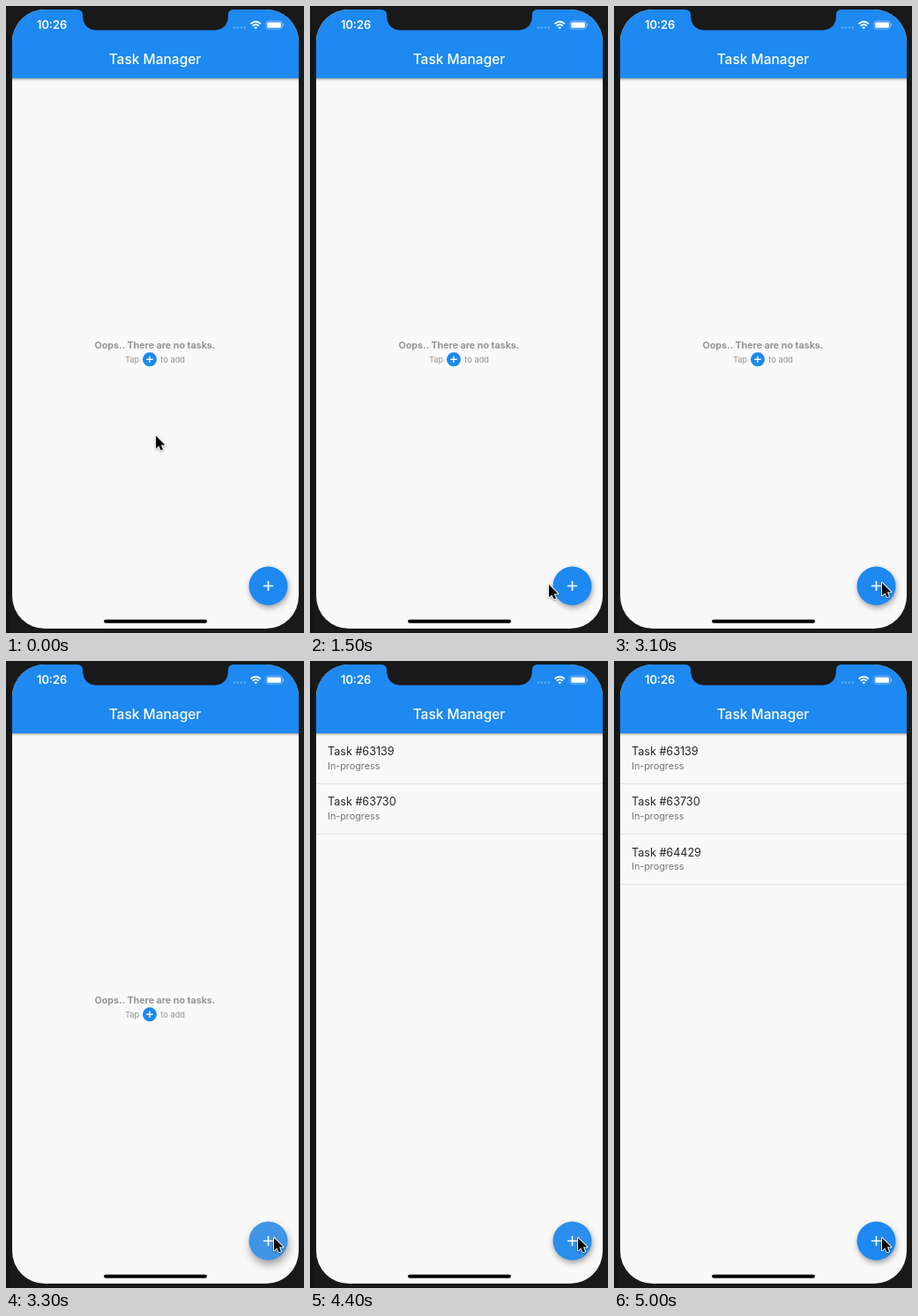
Animation of 338x712 px, one loop 8000 ms. Source, as an HTML page:

```html
<!DOCTYPE html>
<html lang="en">
<head>
<meta charset="utf-8">
<style>
html, body { margin: 0; width: 100%; height: 100%; overflow: hidden; background: #191919; }
svg { display: block; width: 338px; height: 712px; font-family: Inter, Roboto, sans-serif; }
#bar { filter: drop-shadow(0 1px 1.5px rgba(0,0,0,.45)); }
#cursor { filter: drop-shadow(0 1px 1px rgba(0,0,0,.35)); }
</style>
</head>
<body>
<svg viewBox="0 0 338 712">
  <defs>
    <clipPath id="screen"><rect x="7" y="4" width="325" height="703" rx="37"/></clipPath>
    <linearGradient id="edge"><stop stop-color="#0c0d11"/><stop offset="1" stop-color="#191919"/></linearGradient>
  </defs>
  <rect width="338" height="712" fill="#191919"/>
  <rect y="30" width="6" height="682" fill="url(#edge)"/>

  <g clip-path="url(#screen)">
    <rect width="338" height="712" fill="#f9f9f9"/>
    <g id="rows"></g>
    <rect id="bar" width="338" height="82" fill="#1d89f1"/>
    <path d="M80 3H259V4Q252 4 252 10Q252 27.5 235 27.5H104Q87 27.5 87 10Q87 4 80 4Z" fill="#191919"/>
    <text x="169" y="66" font-size="15.5" font-weight="500" fill="#fff" text-anchor="middle">Task Manager</text>

    <g fill="#fff">
      <text x="35" y="26" font-size="12.8" font-weight="600">10:26</text>
      <path d="M259 24.5H273" stroke="#fff" stroke-width="2.6" stroke-dasharray="0 4" stroke-linecap="round" opacity=".3"/>
      <g fill="none" stroke="#fff" stroke-width="1.9">
        <path d="M277.6 20.2Q283.2 15.2 288.8 20.2M279.7 22.6Q283.2 19.6 286.7 22.6"/>
      </g>
      <path d="M281.3 24.2Q283.2 22.8 285.1 24.2L283.2 26.3Z"/>
      <rect x="294.9" y="17" width="18.4" height="9.2" rx="2.6" fill="none" stroke="#fff" stroke-width=".8" opacity=".5"/>
      <rect x="296.3" y="18.4" width="15.6" height="6.4" rx="1.4"/>
      <rect x="314.3" y="20" width="1" height="3.2" rx=".5" opacity=".5"/>
    </g>

    <g id="empty" fill="#949494">
      <text x="169" y="389" font-size="10.7" font-weight="700" text-anchor="middle">Oops.. There are no tasks.</text>
      <g font-size="9.3">
        <text x="135" y="404.6">Tap</text>
        <text x="175.3" y="404.6">to add</text>
      </g>
      <circle cx="163" cy="401.3" r="8" fill="#1d89f1"/>
      <path d="M159.3 401.3H166.7M163 397.6V405" stroke="#fff" stroke-width="1.4"/>
    </g>

    <g id="fab">
      <circle cx="297.5" cy="658.5" r="22" fill="#1d89f1"/>
      <circle id="splash" cx="297.5" cy="658.5" r="22" fill="#bebebe"/>
      <path d="M292 658.5H303M297.5 653V664" stroke="#fff" stroke-width="1.7"/>
    </g>
    <rect x="111" y="696.7" width="117" height="4" rx="2"/>
  </g>

  <path id="cursor" d="M0 0V14.6L3.4 11.4L5.6 16.4L8 15.4L5.8 10.5H10.4Z"
    stroke="#fff" stroke-width="1.8" stroke-linejoin="round" paint-order="stroke"/>
</svg>
<script>
const $ = id => document.getElementById(id);
const STEP = 100, LOOP = 8000;

// id and time of each added task
const tasks = [[63139, 3310], [63730, 3901], [64429, 4600]];
$('rows').innerHTML = tasks.map(([id], i) => `<g transform="translate(0 ${i * 57.2})">
  <text x="20" y="107.3" font-size="12.6" fill="#222">Task #${id}</text>
  <text x="20" y="123" font-size="10.8" fill="#747474">In-progress</text>
  <path d="M7 139.3H332" stroke="#dedede"/></g>`).join('');
const rows = [...$('rows').children];

// keys: time, values...
const path = [
  [0, 170, 488], [100, 170, 481], [200, 170, 481], [400, 205, 490], [600, 280, 535],
  [800, 327, 570], [900, 318, 585], [1100, 302, 640], [1300, 279, 655], [1500, 271, 657],
  [1750, 287, 660], [2000, 304, 655]
];
const press = [
  [3100, 0], [3300, .22], [3400, .18], [3500, 0], [3600, 0], [3900, .1],
  [4000, .2], [4100, 0], [4300, 0], [4600, .28], [5000, 0]
];

function sample(keys, t) {
  const next = keys.findIndex(k => k[0] > t);
  if (next < 0) return keys.at(-1).slice(1);
  if (next === 0) return keys[0].slice(1);
  const a = keys[next - 1], b = keys[next], f = (t - a[0]) / (b[0] - a[0]);
  return a.slice(1).map((v, i) => v + (b[i + 1] - v) * f);
}

function draw() {
  const t = Math.floor(performance.now() % LOOP / STEP) * STEP;
  const [x, y] = sample(path, t), [p] = sample(press, t);
  $('cursor').setAttribute('transform', `translate(${x} ${y})`);
  $('splash').setAttribute('opacity', p);
  $('fab').style.filter = `drop-shadow(1px ${3 + p * 10}px ${3 + p * 8}px rgba(0,0,0,.36))`;
  rows.forEach((row, i) => row.setAttribute('visibility', t >= tasks[i][1] ? 'visible' : 'hidden'));
  $('empty').setAttribute('visibility', t < tasks[0][1] ? 'visible' : 'hidden');
  requestAnimationFrame(draw);
}
draw();
</script>
</body>
</html>
```
